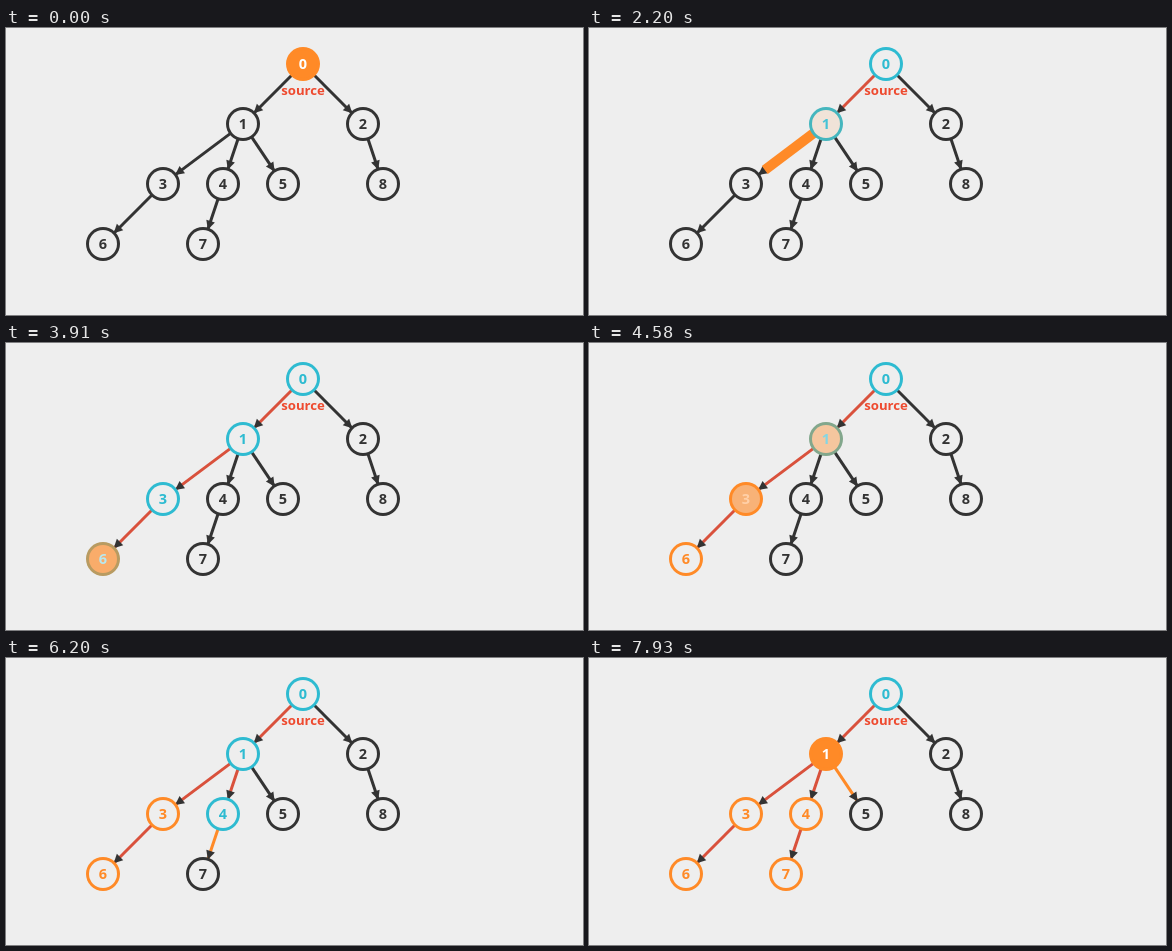
Animation of 577 by 287 pixels, one loop 7.99 s. Source, as an HTML page with a canvas:

```html
<!DOCTYPE html>
<html lang="en">
<head>
<meta charset="utf-8">
<title>Depth-first search</title>
<style>
  html, body { margin: 0; width: 100%; height: 100%; overflow: hidden; background: #eee; }
  canvas { display: block; }
</style>
</head>
<body>
<canvas id="stage" width="577" height="287"></canvas>
<script>
const ctx = document.getElementById('stage').getContext('2d');

const LOOP = 7990, FIRST_CHANGE = 990;
const STEPS_START = 905, STEP = 351.5, DURATION = 346;
const RADIUS = 16;

const BG = [238, 238, 238], DARK = [51, 51, 51], WHITE = [255, 255, 255];
const ORANGE = [255, 138, 39], CYAN = [46, 187, 209], RED = [217, 81, 60];

// Vertex looks: ring, inside, digit
const PLAIN = [DARK, BG, DARK], ACTIVE = [ORANGE, ORANGE, WHITE];
const VISITED = [CYAN, BG, CYAN], FINISHED = [ORANGE, BG, ORANGE];

const vertices = [
  [297, 36], [237, 96], [357, 96], [157, 156], [217, 156],
  [277, 156], [97, 216], [197, 216], [377, 156]
];
const edges = ['01', '02', '13', '14', '15', '28', '36', '47'];

// Each step maps vertices to new looks, edges to new colours, and may trace an edge.
const steps = [
  { trace: '01', 0: VISITED },
  { '01': RED, 1: VISITED },
  { 1: ACTIVE },
  { trace: '13', 1: VISITED },
  { '13': RED, 3: VISITED },
  { 3: ACTIVE },
  { trace: '36', 3: VISITED },
  { '36': RED, 6: VISITED },
  { 6: ACTIVE },
  { 6: FINISHED, 3: ACTIVE },
  { 3: FINISHED, 1: ACTIVE },
  { trace: '14' },
  { '14': RED, 1: VISITED, 4: VISITED },
  { 4: ACTIVE },
  { trace: '47', 4: VISITED },
  { '47': RED, 7: VISITED },
  { 7: ACTIVE },
  { 7: FINISHED, 4: ACTIVE },
  { 4: FINISHED, 1: ACTIVE },
  { trace: '15' }
];

const clamp = x => Math.min(1, Math.max(0, x));
const ease = x => x < 0.5 ? 4 * x ** 3 : 1 - 4 * (1 - x) ** 3;
const mix = (a, b, p) => a.map((v, i) => v + (b[i] - v) * p);
const css = c => `rgb(${c.map(Math.round)})`;

function sceneAt(time) {
  const looks = vertices.map((_, i) => i ? PLAIN : ACTIVE);
  const colours = Object.fromEntries(edges.map(e => [e, DARK]));
  let trace = null;
  steps.forEach((step, k) => {
    const raw = clamp((time - STEPS_START - k * STEP) / DURATION);
    if (raw === 0) return;
    const p = ease(raw);
    for (const [key, value] of Object.entries(step)) {
      if (key === 'trace') {
        if (raw < 1) trace = { edge: value, p };
        else colours[value] = ORANGE;
      } else if (key in colours) {
        colours[key] = mix(colours[key], value, p);
      } else {
        looks[key] = looks[key].map((c, i) => mix(c, value[i], p));
      }
    }
  });
  return { looks, colours, trace };
}

// Moves the origin to the rim of the first vertex, x axis along the edge.
function alongEdge(edge, draw) {
  const [[x1, y1], [x2, y2]] = [...edge].map(i => vertices[i]);
  ctx.save();
  ctx.translate(x1, y1);
  ctx.rotate(Math.atan2(y2 - y1, x2 - x1));
  ctx.translate(RADIUS, 0);
  draw(Math.hypot(x2 - x1, y2 - y1) - 2 * RADIUS);
  ctx.restore();
}

function drawEdge(edge, colour) {
  alongEdge(edge, length => {
    ctx.fillStyle = css(colour);
    ctx.fillRect(0, -1.5, length, 3);
    ctx.fillStyle = css(DARK);
    ctx.beginPath();
    ctx.moveTo(length - 8.1, -4.5);
    ctx.lineTo(length + 0.9, 0);
    ctx.lineTo(length - 8.1, 4.5);
    ctx.fill();
  });
}

function disc(x, y, r, colour) {
  ctx.fillStyle = css(colour);
  ctx.beginPath();
  ctx.arc(x, y, r, 0, 2 * Math.PI);
  ctx.fill();
}

function label(text, x, y, size, colour) {
  ctx.font = `bold ${size}px "Open Sans", "Noto Sans", sans-serif`;
  ctx.fillStyle = colour;
  ctx.fillText(text, x, y);
}

function draw(time) {
  const { looks, colours, trace } = sceneAt(time < FIRST_CHANGE ? 0 : time);
  ctx.fillStyle = css(BG);
  ctx.fillRect(0, 0, 577, 287);
  ctx.textAlign = 'center';

  edges.forEach(e => drawEdge(e, colours[e]));
  if (trace) alongEdge(trace.edge, length => {
    ctx.fillStyle = css(ORANGE);
    ctx.fillRect(0, -5, length * trace.p, 10);
  });
  vertices.forEach(([x, y], i) => {
    const [ring, inside, digit] = looks[i];
    disc(x, y, RADIUS + 1, ring);
    disc(x, y, RADIUS - 2, inside);
    label(i, x, y + 5, 14.5, css(digit));
  });
  label('source', 297, 67, 13.2, '#ee4a2f');
}

function tick() {
  draw(performance.now() % LOOP);
  requestAnimationFrame(tick);
}
tick();
</script>
</body>
</html>
```
